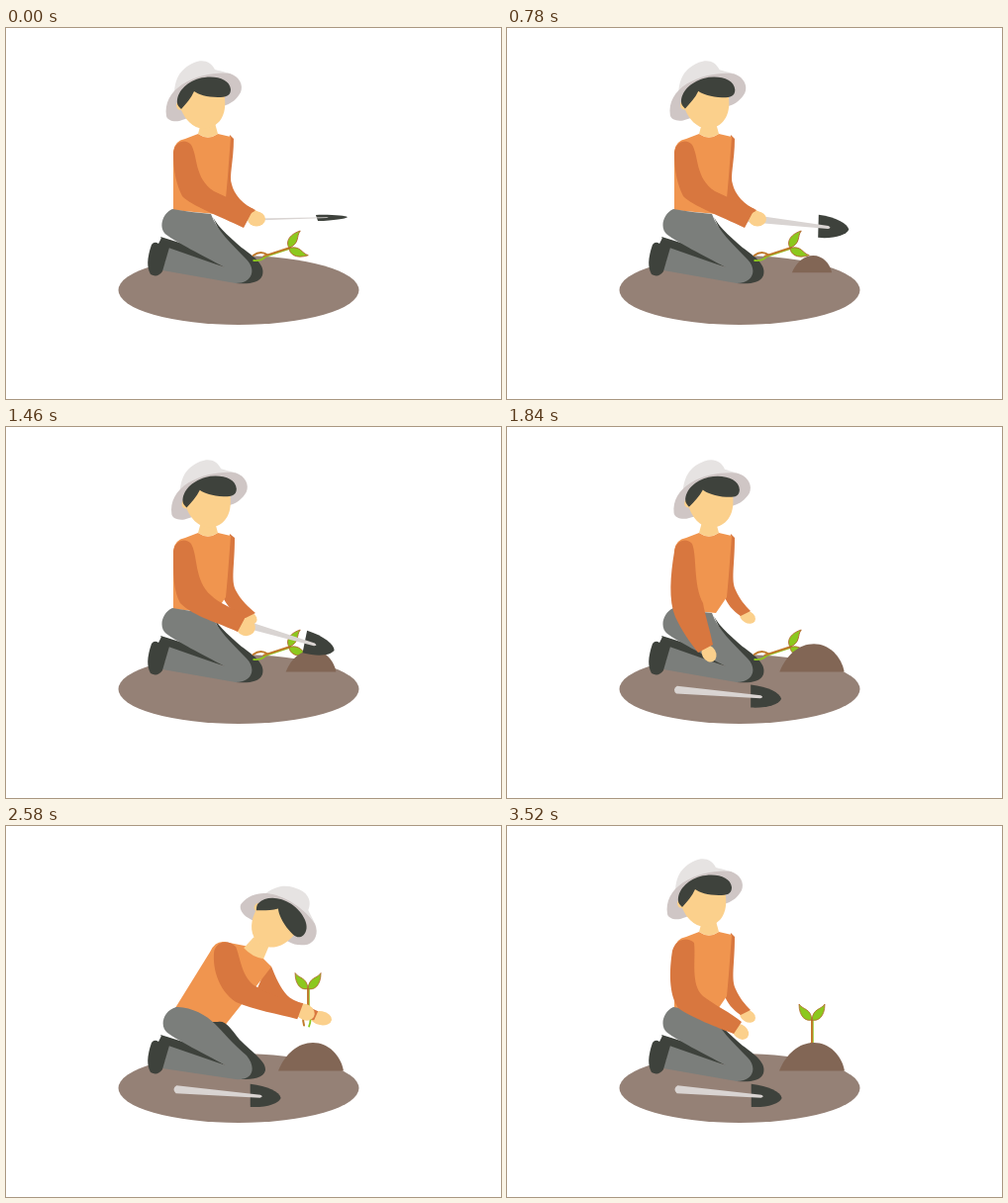
An HTML page that plays this animation: 500 by 375 pixels, repeating every 3.6 s.

```html
<!DOCTYPE html>
<html lang="en">
<head>
<meta charset="utf-8">
<title>Planting</title>
<style>
  html, body { margin: 0; width: 100%; height: 100%; overflow: hidden; background: #fff; }
  svg { display: block; width: 500px; height: 375px; }
</style>
</head>
<body>
<svg viewBox="0 0 500 375">
  <ellipse cx="235" cy="265" rx="121.5" ry="35" fill="#958176"/>
  <ellipse id="farHand" rx="1" ry="1" fill="#fbd08c"/>
  <path id="far" fill="#d8773f"/>
  <path id="torso" fill="#f0954f"/>
  <path id="shade" fill="#3e423c"/>
  <path fill="#3e423c" d="M156 211L185 220L222 242L164 226Z"/>
  <path id="leg" fill="#7b7e7b"/>
  <path fill="#3e423c" d="M147 219Q150 215 154 218L157 212L167 215L158 246Q153 253 146 249Q140 239 147 219Z"/>
  <path id="neck" fill="#fbd08c"/>
  <g id="plant" stroke-linecap="round">
    <path d="M.8 0V26Q4 32 1 39" fill="none" stroke="#8cc81e" stroke-width="1.8"/>
    <path d="M0 0V28M0 24Q-7 29 -4 38" fill="none" stroke="#c07a2c" stroke-width="2"/>
    <g fill="#8cc81e" stroke="#b5652f" stroke-width=".8">
      <path d="M0 1C-6 3 -13 -2 -13 -15C-9 -9 -1 -11 0 1Z"/>
      <path d="M0 1C6 3 13 -2 13 -15C9 -9 1 -11 0 1Z"/>
    </g>
  </g>
  <path id="mound" fill="#826655" d="M-33 .5C-26 -17 -13 -28 2 -28C18 -28 30 -15 33 .5Z"/>
  <g id="head">
    <path fill="#e6e3e2" d="M170 68C170 45 182 39 190 35C199 31 207 34 211 42C218 44 226 45 230 48L215 62Z"/>
    <path fill="#cfc6c5" d="M162 89C160 76 166 65 178 57C194 47 215 44 226 46C236 49 240 58 237 65C233 72 228 76 222 78L175 94C168 95 163 93 162 89Z"/>
    <path fill="#fbd08c" d="M172 78C176 60 222 52 221 72C223 92 212 101 200 102C188 101 181 92 177 83Q172 83 172 78Z"/>
    <path fill="#3e423c" d="M173 76C172 65 182 55 195 51C210 47 226 51 227 62C227 69 222 70 214 70C203 70 194 67 190 64C187 71 182 76 177 82C175 80 173 78 173 76Z"/>
  </g>
  <g id="trowel">
    <path fill="#3e423c" d="M77 -11.5C95 -11 107 -6 109 0C107 6 95 11 79 11.5Z"/>
    <path fill="#d9d4d2" d="M3 -4Q-2 0 3 4L88 1.5Q92 0 88 -1.5Z"/>
  </g>
  <ellipse id="nearHand" rx="1" ry="1" fill="#fbd08c"/>
  <path id="near" fill="#d8773f"/>
</svg>
<script>
const LOOP = 3600;
const $ = id => document.getElementById(id);
const pose = (base, change) => ({ ...base, ...change });

// head: x, y, turn; hands: x, y, rx, ry, turn; trowel: x, y, turn, flatness; plant: x, y, turn
const up = {
  torso: 'M169 184L169 125Q170 114 181 112L194 107Q204 114 214 107L227 110L224 150L222 172L211 188Z',
  neck: 'M197 96L211 96L214 107Q204 114 194 107Z',
  leg: 'M168 183C157 188 154 203 162 209C173 217 197 229 221 242L164 222L158 245L232 258C249 258 253 244 243 234C228 218 213 205 207 188C195 187 180 185 168 183Z',
  shade: 'M207 187C212 199 222 208 238 222C252 232 262 240 259 250C256 258 245 259 232 258L220 215Z',
  far: 'M226 108L230 112C230 135 225 150 228 158C230 168 240 179 252 184L244 192C232 186 225 180 221 172C222 150 224 130 226 108Z',
  near: 'M169 126C169 145 172 158 178 170C188 180 215 190 240 202L250 183C235 176 222 171 210 165C190 152 194 130 187 118C182 112 171 113 169 126Z',
  head: [200, 80, 0],
  nearHand: [253, 193, 9, 7.5, 0],
  farHand: [250, 190, 8, 6, 20],
  trowel: [236, 194, -1.5, .27],
  plant: [287, 222, 72]
};
const turn = pose(up, { head: [203, 80, 1], trowel: [237, 191.5, 6.5, 1] });
const down = pose(up, {
  far: 'M226 108L231 112C231 140 227 155 232 165C237 175 245 182 252 188L240 194C230 188 223 180 220 174C222 150 224 130 226 108Z',
  near: 'M169 126C169 150 169 165 176 178C190 192 215 198 234 207L243 190C230 184 215 178 207 170C190 155 194 130 187 118C182 112 171 113 169 126Z',
  head: [205.5, 80, 1],
  nearHand: [242, 202, 10, 9, 15],
  farHand: [246, 193, 8, 6, 30],
  trowel: [227, 195, 16, 1]
});
const dig = pose(down, {
  near: 'M169 126C167 150 167 170 174 184C190 197 213 203 229 212L238 196C226 190 210 182 203 175C189 160 192 130 187 118C182 112 171 113 169 126Z',
  head: [207, 80, 2],
  nearHand: [238, 207, 9, 8, 30],
  trowel: [228, 196, 44, 1]
});
const rest = pose(up, {
  far: 'M226 108L230 112C230 140 226 155 231 165C235 174 240 180 246 186L236 191C228 186 222 178 220 172C222 150 224 130 226 108Z',
  near: 'M167 126C164 145 163 170 173 184C185 193 213 204 229 210L237 198C228 190 208 180 198 172C185 160 191 135 189 118C183 112 171 113 167 126Z',
  nearHand: [236, 208, 9, 7, 40],
  farHand: [243, 192, 8.5, 6, 30],
  trowel: [169, 266, 4.7, 1],
  plant: [308, 195, 0]
});
const drop = pose(rest, {
  near: 'M169 126C165 150 163 175 170 192C176 205 185 218 193 228L208 220C205 205 200 190 198 178C188 160 192 130 187 118C182 112 171 113 169 126Z',
  head: [207, 80, 3],
  nearHand: [204, 229, 9, 7, 60],
  trowel: [154, 248, 10, 1],
  plant: up.plant
});
const laid = pose(drop, { trowel: rest.trowel });
const grab = pose(laid, {
  torso: 'M170 184L209 127Q215 116 223 117L240 122Q252 136 262 133L270 143L255 165L238 182L216 200Z',
  neck: 'M258 112L266 130L261 135Q250 134 244 125Z',
  leg: 'M172 183C158 187 155 203 163 209C174 217 198 229 222 242L164 222L158 245L232 256C250 258 253 244 243 232C230 221 219 208 211 200C203 191 185 182 172 183Z',
  shade: 'M214 198C221 196 226 203 236 216C250 230 263 238 262 247C260 255 250 256 238 256L205 198Z',
  far: 'M268 140L270 146C270 160 263 172 262 180C265 192 268 207 275 221L263 221C250 213 243 190 243 178C248 172 258 158 268 140Z',
  near: 'M214 126C205 142 200 160 202 170C208 182 230 203 247 223L257 212C249 200 240 190 232 178C223 165 231 145 232 126C230 116 220 115 214 126Z',
  head: [276, 111.5, 71],
  nearHand: [258, 222, 10, 7, 45],
  farHand: [269, 227, 8, 6.5, 20],
  plant: [289, 224, 72]
});
const hold = pose(up, {
  nearHand: [254, 193, 9, 7.5, 0],
  farHand: [261, 190, 10, 7, 0],
  trowel: rest.trowel,
  plant: [258, 165, 0]
});
const lift = pose(grab, {
  torso: 'M171 184L206 127Q211 116 220 117L242 121Q248 132 258 132L268 142L258 155L246 170L220 203Z',
  neck: 'M250 112L265 122L260 134Q248 132 240 123Z',
  far: 'M262 138L268 142C272 152 277 164 284 171C290 177 304 181 315 187L311 196C285 193 262 178 254 164C254 162 258 158 262 138Z',
  near: 'M210 126C208 142 213 165 232 178C250 186 275 190 294 195L300 179C285 176 265 170 252 162C238 153 237 135 232 122C225 115 214 115 210 126Z',
  head: [269, 101, 49],
  nearHand: [302, 188, 10, 8, 30],
  farHand: [318, 194, 11, 7, 10],
  plant: [305, 163, 0]
});
const pat = pose(grab, {
  torso: 'M169 186L221 132Q228 124 236 124.500L256 133Q262 148 270 146L276 159L264 170L245 185L216 207Z',
  neck: 'M269 126L278 144L271 149Q261 145 255 136Z',
  far: 'M270 150L276 159C280 166 285 175 289 179C298 181 312 192 326 200L322 212C303 211 280 204 258 188C262 170 266 162 270 150Z',
  near: 'M228 133C225 145 233 172 245 185C268 193 288 199 308 206L315 188C298 184 278 178 265 168C254 160 251 145 248 132C243 122 233 123 228 133Z',
  head: [287.5, 125.5, 71],
  nearHand: [316, 197, 10, 8, 20],
  farHand: [330, 207, 10, 7, 0],
  plant: rest.plant
});
const press = pose(pat, {
  far: 'M270 150L276 159C280 166 284 177 287 183C295 188 308 199 320 207L316 218C296 213 278 204 258 190C262 170 266 162 270 150Z',
  near: 'M228 133C225 147 231 176 243 188C265 197 280 203 300 212L308 197C292 190 275 183 263 172C254 162 251 145 248 132C243 122 233 123 228 133Z',
  nearHand: [309, 206, 10, 8, 25],
  farHand: [324, 214, 10, 7, 10]
});

const ease = {
  both: k => k * k * (3 - 2 * k),
  in: k => k * k,
  out: k => k * (2 - k)
};
// time, pose, easing on the way to it
const scoop = t => [[t, up], [t + 180, turn], [t + 260, down, 'in'], [t + 400, dig, 'out']];
const steps = [
  ...scoop(0), ...scoop(600), ...scoop(1200),
  [1620, dig], [1770, drop], [1850, laid], [2080, grab], [2130, grab],
  [2390, hold], [2580, lift, 'in'], [2700, pat, 'out'],
  [2830, press], [2960, pat], [3090, press], [3220, pat], [3290, pat],
  [3520, rest], [LOOP, rest]
];
const heap = [
  [0, 0], [480, 0], [680, .61], [1240, .61], [1400, .77],
  [1700, .77], [1860, 1], [LOOP, 1]
];

const mix = (a, b, k) => a + (b - a) * k;
const mixList = (a, b, k) => a.map((v, i) => mix(v, b[i], k));
const number = /-?[\d.]+/g;
function mixPath(a, b, k) {
  if (a === b) return a;
  const to = b.match(number);
  let i = 0;
  return a.replace(number, v => mix(+v, +to[i++], k).toFixed(2) + ' ');
}
function span(keys, t) {
  let i = 1;
  while (i < keys.length - 1 && t >= keys[i][0]) i++;
  const [t0, a] = keys[i - 1], [t1, b, kind = 'both'] = keys[i];
  return [a, b, ease[kind]((t - t0) / (t1 - t0))];
}
const place = (id, value) => $(id).setAttribute('transform', value);

function draw(t) {
  const [a, b, k] = span(steps, t);
  for (const id of ['torso', 'neck', 'leg', 'shade', 'far', 'near'])
    $(id).setAttribute('d', mixPath(a[id], b[id], k));
  const at = id => mixList(a[id], b[id], k);

  const [hx, hy, hr] = at('head');
  place('head', `translate(${hx} ${hy}) rotate(${hr}) translate(-200 -80)`);
  for (const id of ['nearHand', 'farHand']) {
    const [x, y, rx, ry, r] = at(id);
    place(id, `translate(${x} ${y}) rotate(${r}) scale(${rx} ${ry})`);
  }
  const [tx, ty, tr, flat] = at('trowel');
  place('trowel', `translate(${tx} ${ty}) rotate(${tr}) scale(1 ${flat})`);
  const [px, py, pr] = at('plant');
  place('plant', `translate(${px} ${py}) rotate(${pr})`);
  place('mound', `translate(308 247) scale(${mix(...span(heap, t))})`);
}

const start = performance.now();
function tick() {
  draw((performance.now() - start) % LOOP);
  requestAnimationFrame(tick);
}
tick();
</script>
</body>
</html>
```
